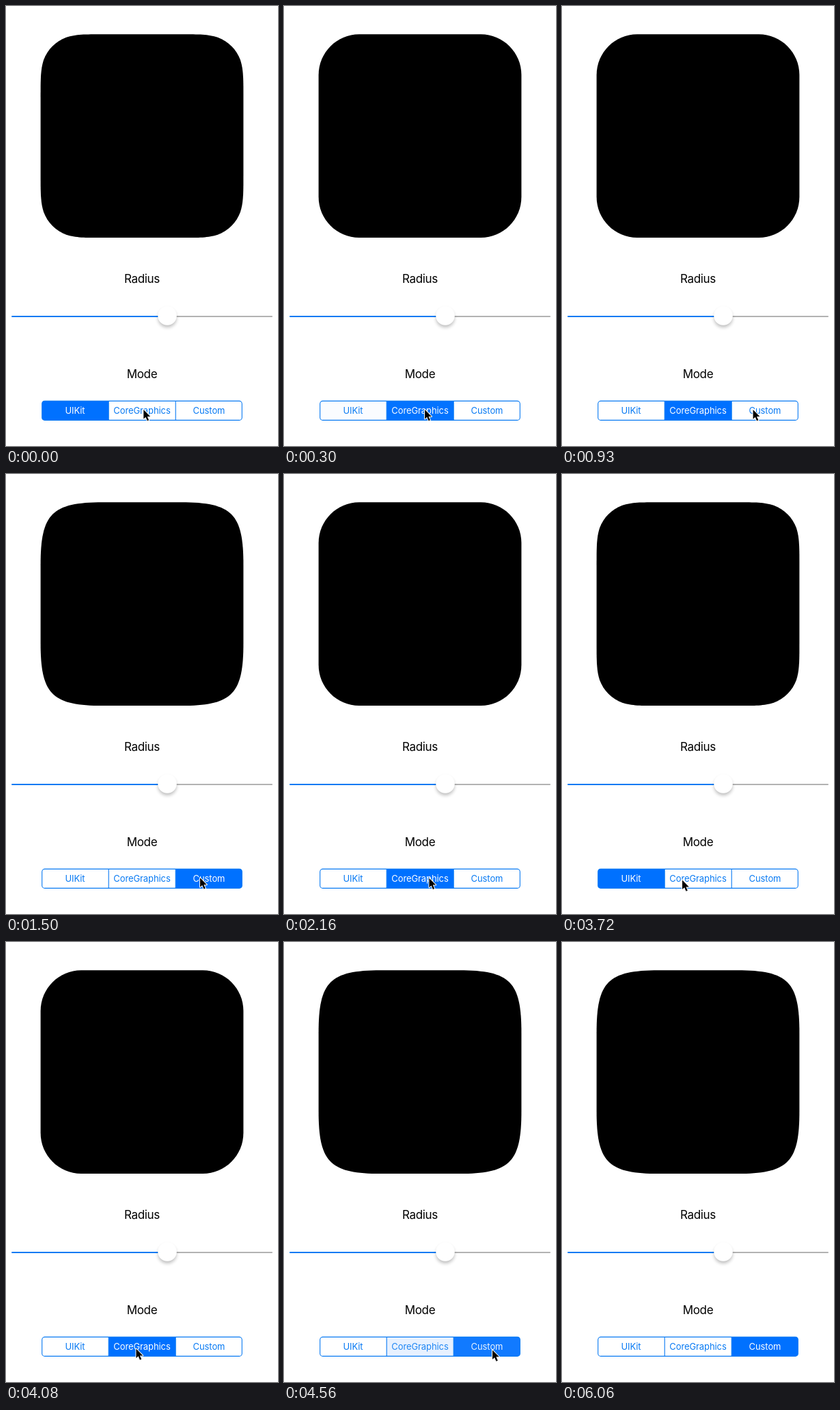
Animation, 398 px wide and 642 px high, one loop 6090 ms. Source, as an HTML page:

```html
<!DOCTYPE html>
<html lang="en">
<head>
<meta charset="utf-8">
<title>Corner modes</title>
<style>
  html, body { margin: 0; width: 100%; height: 100%; overflow: hidden; background: #fff; }
  svg { display: block; width: 398px; height: 642px; }
  text { font-family: Inter, Roboto, sans-serif; text-anchor: middle; }
  .label { font-size: 17px; letter-spacing: -0.35px; }
  .seg text { font-size: 13px; letter-spacing: -0.1px; }
</style>
</head>
<body>
<svg viewBox="0 0 398 642">
  <defs>
    <filter id="soft" x="-50%" y="-50%" width="200%" height="200%">
      <feGaussianBlur stdDeviation="2.6"/>
    </filter>
    <clipPath id="bar"><rect x="52.5" y="576" width="293" height="28.6" rx="4"/></clipPath>
  </defs>
  <rect width="398" height="642" fill="#fff"/>
  <path id="shape"/>

  <text class="label" x="199" y="404">Radius</text>
  <path d="M9 453H236" stroke="#087af3" stroke-width="2" stroke-linecap="round"/>
  <path d="M236 453H389" stroke="#b2b2b2" stroke-width="2" stroke-linecap="round"/>
  <circle cx="236" cy="455.5" r="13.5" opacity=".25" filter="url(#soft)"/>
  <circle cx="236" cy="452" r="13.8" fill="#fff"/>

  <text class="label" x="199" y="543">Mode</text>
  <g id="segs" class="seg" clip-path="url(#bar)"></g>
  <g fill="none" stroke="#087af3" stroke-width="1.1">
    <rect x="52.7" y="576.4" width="292.6" height="28" rx="4"/>
    <path d="M150.2 576.4V604.4M248.2 576.4V604.4"/>
  </g>
  <path id="cursor" d="M0 0V13.6L3.1 10.7L5.5 16.2L7.8 15.2L5.4 9.9H9.8Z"
        stroke="#fff" stroke-width="2" stroke-linejoin="round" paint-order="stroke"/>
</svg>
<script>
const NS = 'http://www.w3.org/2000/svg';
const LOOP = 6090, FADE = 110, PRESS = 60, TINT = 0.3;
const CENTER = { x: 199, y: 189.7 }, HALF = 148.4, RADIUS = 59.5;
const FILL = [0, 113, 255], INK = [8, 122, 243], WHITE = [255, 255, 255];
const byId = id => document.getElementById(id);
const ease = v => {
  const c = Math.max(0, Math.min(1, v));
  return c * c * (3 - 2 * c);
};
const lerp = (a, b, p) => a + (b - a) * p;
const mix = (a, b, p) => `rgb(${a.map((v, i) => Math.round(lerp(v, b[i], p)))})`;

// Mirrors half a corner (radius units), then turns it around the centre.
function outline(half) {
  const corner = [...half, ...half.map(([u, v]) => [v, u]).reverse()];
  let d = '';
  for (let turn = 0; turn < 4; turn++) {
    const points = corner.map(([u, v]) => {
      let x = HALF - u * RADIUS, y = v * RADIUS - HALF;
      for (let i = 0; i < turn; i++) [x, y] = [-y, x];
      return [CENTER.x + x, CENTER.y + y];
    });
    d += `${turn ? 'L' : 'M'}${points[0]}C${points.slice(1).join(' ')}`;
  }
  return d + 'Z';
}

const REACH = 1.5287, PULL = 0.28, JOINT = [0.6315, 0.0749];
const smooth = [[REACH, 0], [1.0885, 0], [0.8684, 0], JOINT, [0.3728, 0.1691]];
const round = [[1, 0], [0.4477, 0]];
const single = [[REACH, 0], [PULL, 0]];
const modes = [['UIKit', smooth], ['CoreGraphics', round], ['Custom', single]];
const shapes = modes.map(([, half]) => outline(half));

function add(tag, attrs) {
  const el = document.createElementNS(NS, tag);
  for (const key in attrs) el.setAttribute(key, attrs[key]);
  byId('segs').append(el);
  return el;
}
const segs = modes.map(([name], i) => {
  const rect = add('rect', { x: 52.2 + 98 * i, y: 576, width: 98, height: 28.6 });
  const text = add('text', { x: 101 + 98 * i, y: 595 });
  text.textContent = name;
  return { rect, text };
});

// [time, chosen mode]
const taps = [[200, 1], [1020, 2], [2010, 1], [2759, 0], [3960, 1], [4472, 2]];

// Pointer glides: [start, end, x reached]
const glides = [
  [150, 560, 217], [560, 1000, 284], [1500, 1800, 217], [2080, 2720, 113],
  [3210, 3700, 176], [3750, 3930, 188], [4050, 4410, 305], [4560, 4800, 385]
];
const LEAVE = 4800;

function pointer(t) {
  let x = 201.3;
  for (const [from, to, goal] of glides) x = lerp(x, goal, ease((t - from) / (to - from)));
  return [x, 589 + 7.5 * (t / LEAVE) ** 3];
}

function draw(t) {
  let mode = 0, last = 0, p = 1, pressed = -1;
  for (const [at, next] of taps) {
    if (t >= at) {
      [last, mode] = [mode, next];
      p = ease((t - at) / FADE);
    } else if (t >= at - PRESS) pressed = next;
  }
  byId('shape').setAttribute('d', shapes[mode]);
  segs.forEach(({ rect, text }, i) => {
    const ink = i === mode ? p : i === last ? 1 - p : 0;
    const fill = i === pressed ? TINT : i === mode ? lerp(TINT, 1, p) : ink;
    rect.setAttribute('fill', mix(WHITE, FILL, fill));
    text.setAttribute('fill', mix(INK, WHITE, ink));
  });
  const cursor = byId('cursor');
  cursor.setAttribute('visibility', t < LEAVE ? 'visible' : 'hidden');
  cursor.setAttribute('transform', `translate(${pointer(t)})`);
}

const start = performance.now();
function tick() {
  draw((performance.now() - start) % LOOP);
  requestAnimationFrame(tick);
}
tick();
</script>
</body>
</html>
```
